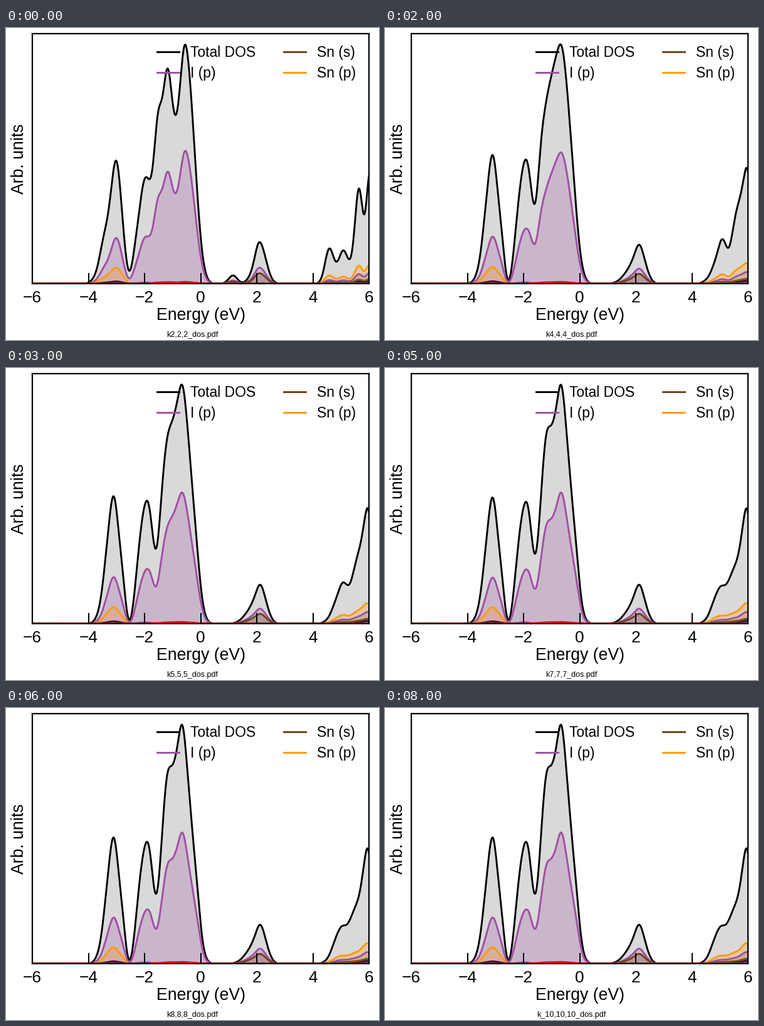
Recreate the animation shown at these times as a matplotlib script. Size 595 by 498 pixels, loop 9000 ms.

```python
import numpy as np
import matplotlib.pyplot as plt
from matplotlib.animation import FuncAnimation

W, H, DPI = 595, 498, 100
PT = 72 / DPI                              # points per pixel
LEFT, RIGHT, TOP, BASE = 42, 579, 9, 408   # plot box in pixels
SIGMA = 6.7                                # smearing of 0.15 eV in pixels
LINE = 2.9 * PT
X = np.arange(LEFT, RIGHT + 0.5, 0.5)

plt.rcParams["font.family"] = "Liberation Sans"


def gauss(x, centres):
    return np.exp(-0.5 * ((x[:, None] - centres) / SIGMA) ** 2)


def density(points):
    """Sum of smeared levels that passes through the key points."""
    c, y = np.array(points, float).T
    return np.maximum(gauss(X, c) @ np.linalg.solve(gauss(c, c), y), 0)


def scaled(points, k):
    return [(x, y * k) for x, y in points]


# key points of each band: x, height in pixels
low2 = [(143, 18), (155, 73), (166, 136), (176, 196), (186, 104), (196, 21),
        (206, 66), (216, 142), (224, 170), (233, 180)]
top2 = [(243, 276), (256, 340), (263, 314), (270.5, 269), (279, 333),
        (286.5, 381), (296, 289), (305, 147), (314, 43)]
gap2 = [(362, 13), (391, 20), (403, 65), (413, 45), (423, 11)]
high2 = [(515.5, 56), (527, 35), (538, 53), (548, 39), (556, 91), (564.5, 149),
         (573, 116), (579, 172)]

low = [(150, 34), (161, 127), (172, 201), (184, 104), (196.5, 6), (207, 70),
       (215.5, 152), (224, 194), (231, 167)]
top3 = [(240.5, 104), (252, 260), (263, 381), (273.5, 307), (283.5, 373),
        (294, 253), (304, 140), (314, 37)]
gap3 = [(361, 3), (385, 15), (395, 41), (407, 57), (417, 25)]
high3 = [(510, 7), (521, 31), (531, 32), (542, 59), (552, 66), (561, 114),
         (570, 169), (579, 188)]

top4 = [(238, 127), (249, 228), (260, 307), (270.5, 354), (281, 381),
        (291, 304), (301, 172), (311, 55)]
gap = [(372, 5), (383, 17), (394, 37), (405.5, 62), (416, 32)]
high4 = [(514, 9), (526, 36), (538, 71), (547, 57), (558, 104), (568, 146),
         (579, 179)]

top = [(238.5, 112), (248, 192), (258, 306), (269.5, 328), (281, 381),
       (292, 276), (303, 148), (313, 42)]
high = [(514, 11), (525, 39), (536, 60), (548, 69), (558, 93), (569, 144),
        (579, 177)]

k2 = density(low2 + top2 + gap2 + high2)
k3 = density(scaled(low, 1.03) + top3 + gap3 + high3)
k4 = density(scaled(low, 1.02) + top4 + gap + high4)
converged = density(low + top + gap + high)
TOTALS = [k2, k3, k4, (k4 + converged) / 2] + [converged] * 5
CAPTIONS = [f"k{n},{n},{n}_dos.pdf" for n in range(2, 10)] + ["k_10,10,10_dos.pdf"]

BAND = np.digitize(X, [197, 232, 340, 450])


def share(*per_band):
    """Fraction of the total in each band, blended at the edges."""
    s = np.choose(BAND, per_band)
    return np.convolve(np.pad(s, 10, mode="edge"), np.full(21, 1 / 21), "valid")


PURPLE, BROWN, ORANGE = "#a04fa3", "#6b4216", "#ff9a08"
rising = 0.34 + 0.0015 * (X - 155)
PARTS = [
    ("#4a7fc8", share(0, 0.012, 0, 0, 0)),
    (PURPLE, share(rising, rising, 0.498 + 0.00125 * (X - 240), 0.385, 0.1)),
    (BROWN, share(0, 0, 0, 0.25, 0.03)),
    (ORANGE, share(0.13, 0, 0, 0, 0.25 - 0.0009 * (X - 495))),
    ("#4b0050", share(0.018, 0, 0, 0, 0.022)),
    ("#5c6400", share(0, 0, 0, 0, 0.042)),
    ("#ff0000", share(0, 0, 0.007, 0, 0)),
]

fig = plt.figure(figsize=(W / DPI, H / DPI), dpi=DPI, facecolor="white")
ax = fig.add_axes([LEFT / W, 1 - BASE / H, (RIGHT - LEFT) / W, (BASE - TOP) / H])
ax.set_xlim(LEFT, RIGHT)
ax.set_ylim(0, BASE - TOP)
ax.set_yticks([])
ax.set_xticks(np.linspace(LEFT, RIGHT, 7), [""] * 7)
ax.tick_params(axis="x", direction="in", length=17.5 * PT, width=2 * PT)
ax.set_axisbelow(False)
for spine in ax.spines.values():
    spine.set_linewidth(2.2 * PT)


def label(x, y, s, size, **kw):
    return fig.text(x / W, 1 - y / H, s, fontsize=size * PT, va="baseline", **kw)


def layer(color, alpha):
    fill, = ax.fill([0, 0], [0, 0], fc=color, alpha=alpha, lw=0, zorder=1)
    line, = ax.plot([], [], color=color, lw=LINE, zorder=2)
    return fill, line


layers = [layer("black", 0.15)] + [layer(c, 0.25) for c, _ in PARTS]

for x, y, color, name in [(240, 38, "black", "Total DOS"), (240, 70.5, PURPLE, "I (p)"),
                          (442, 38, BROWN, "Sn (s)"), (442, 70.5, ORANGE, "Sn (p)")]:
    ax.plot([x + 1, x + 35.5], [BASE - y] * 2, color=color, lw=LINE, zorder=4)
    label(x + 54.3, y + 8, name, 22.9)

for i, e in enumerate(range(-6, 7, 2)):
    label(LEFT + 89.5 * i, 438, str(e).replace("-", "\u2212"), 26.4, ha="center")
label(311, 466, "Energy (eV)", 26.6, ha="center")
label(28, 208.5, "Arb. units", 26.6, ha="center", rotation=90, rotation_mode="anchor")
caption = label(297.5, 493, "", 12.5, ha="center")


def draw(i):
    total = TOTALS[i]
    for (fill, line), y in zip(layers, [total] + [total * s for _, s in PARTS]):
        line.set_data(X, y)
        fill.set_xy(np.column_stack([np.r_[LEFT, X, RIGHT], np.r_[0, y, 0]]))
    caption.set_text(CAPTIONS[i])
    return []


anim = FuncAnimation(fig, draw, frames=9, interval=1000, repeat=True)
plt.show()
```
